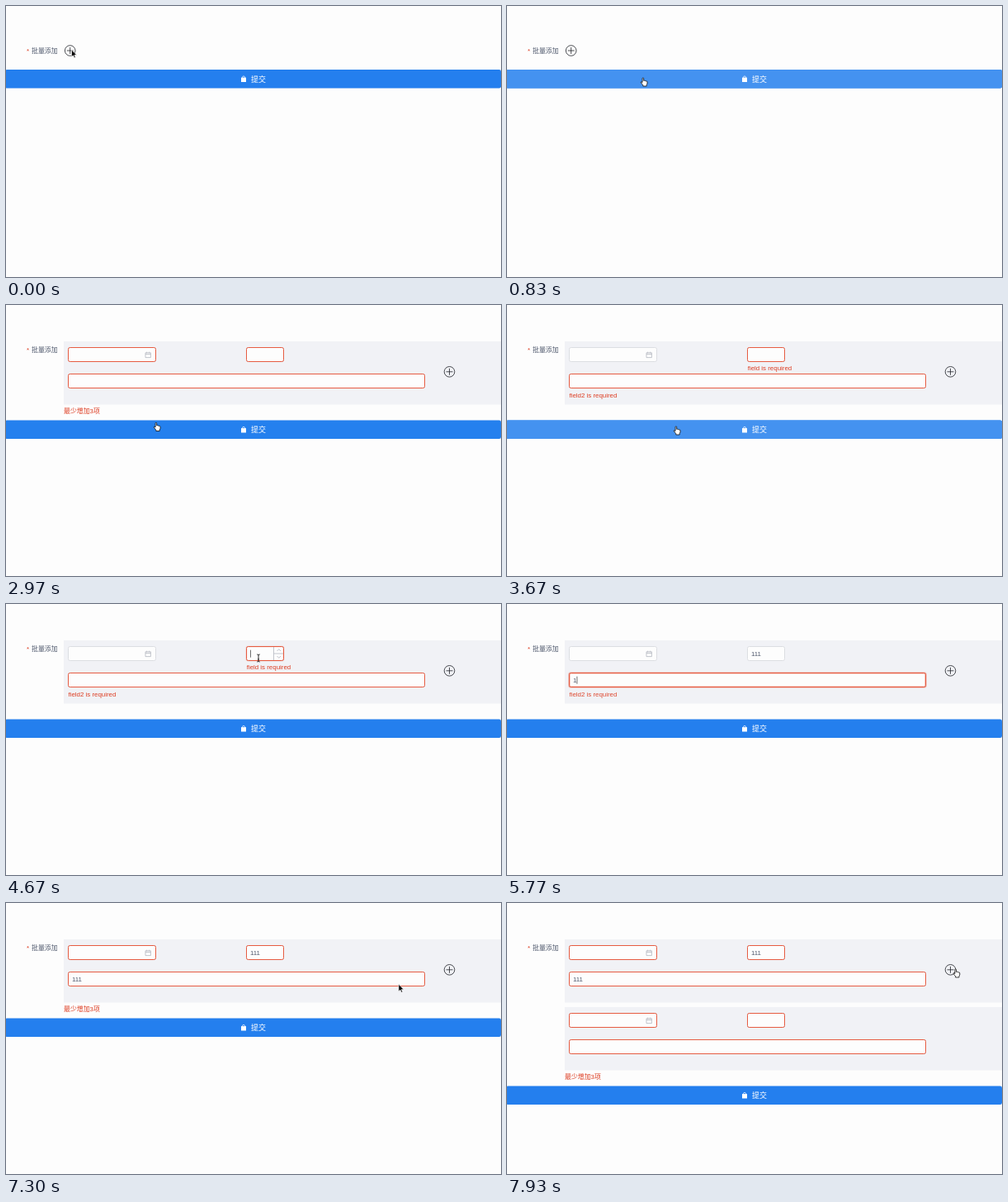
An HTML page for the animation above (8000 ms loop, 600x328 px).

```html
<!DOCTYPE html>
<html lang="zh-CN">
<head>
<meta charset="utf-8">
<title>批量添加</title>
<style>
  html, body { margin: 0; width: 100%; height: 100%; overflow: hidden; background: #fdfdfd; }
  svg { display: block; width: 100%; height: 100%; }
  text { font: 7.9px "Liberation Sans", "Noto Sans CJK SC", "Noto Sans CJK", sans-serif; white-space: pre; }
  .ink { fill: #515a6e; }
  .err { fill: #dd3d22; }
  .line { fill: none; stroke: #dcdee2; }
  .red { fill: none; stroke: #e65c42; }
  .blue { fill: none; stroke: #4a94ee; }
  .icon { fill: none; stroke: #b4b8c0; stroke-width: .8; }
</style>
</head>
<body>
<svg id="stage" viewBox="0 0 600 328" xmlns="http://www.w3.org/2000/svg">
  <text x="25" y="57.3" class="err">*</text>
  <text x="31" y="57" class="ink">批量添加</text>
  <g id="cards"></g>
  <g id="plus" fill="none" stroke="#2b2d33" stroke-width=".85">
    <circle r="6.3"/><path d="M-4 0H4M0-4V4"/>
  </g>
  <text id="minError" x="70" class="err">最少增加3项</text>
  <g id="button">
    <rect x="-1" y="77" width="601" height="22.5" rx="2.2" fill="#247fee"/>
    <rect id="hover" x="-1" y="77" width="601" height="22.5" rx="2.2" fill="#4492f0"/>
    <path d="M285 86.6h6v5.4h-6z" fill="#fff"/>
    <path d="M286.5 87v-.6a1.5 1.5 0 0 1 3 0v.6" fill="none" stroke="#fff" stroke-width=".7"/>
    <text x="297" y="91.8" fill="#fff" style="font-size:9px">提交</text>
  </g>
  <g id="cursor" stroke-linejoin="round">
    <path id="arrow" d="M0 0V8.6L2 6.8 3.3 9.8 4.7 9.2 3.4 6.3H6.1Z" stroke="#fff" stroke-width=".6"/>
    <path id="hand" d="M-.9.7a.8.8 0 0 1 1.6 0V3.4q.8-.6 1.5.2 1-.5 1.5.4 1.3-.3 1.3 1V7L4.2 8.5V10H-.2V8.7L-2.6 5.8q-.5-1.2.6-1.1L-.9 5.6Z" fill="#fff" stroke="#111" stroke-width=".8"/>
    <path id="beam" d="M-1.7-4.5Q0-4.5 0-3.4 0-4.5 1.7-4.5M0-3.4V3.4M-1.7 4.5Q0 4.5 0 3.4 0 4.5 1.7 4.5M-.9 1.4H.9" fill="none" stroke="#111" stroke-width=".9"/>
  </g>
</svg>
<script>
const LOOP = 8000;
const $ = id => document.getElementById(id);

// x, y, width of the three inputs in a card
const FIELDS = { date: [75.5, 51.5, 106], num: [291.5, 51.5, 45], text: [75.5, 83.5, 432] };

const box = ([x, y, w], cls, extra = '') =>
  `<rect x="${x}" y="${y}" width="${w}" height="17" rx="2" class="${cls}" ${extra}/>`;

function field(name, n) {
  const f = FIELDS[name], id = name + n;
  return box(f, 'line', 'style="fill:#fdfdfd"') +
    `<g id="${id}Blue">${box(f, 'blue', 'stroke-width="2.6" opacity=".25"')}${box(f, 'blue')}</g>` +
    `<g id="${id}Ring">${box(f, 'red', 'stroke-width="2.6" opacity=".35"')}</g>` +
    box(f, 'red', `id="${id}Red"`) +
    `<text id="${id}Value" class="ink" x="${f[0] + 4.5}" y="${f[1] + 11.6}"></text>`;
}

const card = n => `<g id="card${n}" transform="translate(0 ${n * 82})">
  <rect x="70" y="44" width="531" height="76.5" fill="#f1f2f6"/>
  ${Object.keys(FIELDS).map(name => field(name, n)).join('')}
  <path class="icon" d="M169 57.8h6.4v5.8H169zM169 59.6h6.4M170.7 56.7v1.6M173.7 56.7v1.6"/></g>`;

$('cards').innerHTML = card(0) + card(1) + `
  <path id="spin" class="icon" d="M324.5 52V68M324.5 60H336M328.6 57l2.2-2.4 2.2 2.4M328.6 63l2.2 2.4 2.2-2.4"/>
  <text id="numError" class="err" x="291.7" y="79.3">field is required</text>
  <text id="textError" class="err" x="75.5" y="111.5">field2 is required</text>
  <path id="caret" stroke="#333" stroke-width=".7" d="M0-4.5V4.5"/>`;

const ADD = [1950, 7600];
const TYPED = { num: [4880, 5000, 5120], text: [5750, 5880, 6010] };
const SUBMIT = 6780;

// on, off, on, off ... with the first red state starting at once
const RED = { date: [1700, 3330, SUBMIT], num: [1700, 4880, SUBMIT], text: [1700, 5800, SUBMIT] };
const HOVER = [480, 1190, 2965, 4290, 6380, 7060];

// time, x, y
const PATH = [
  [0, 79.5, 53], [200, 79.5, 53], [720, 165, 87], [1040, 165, 87], [1460, 79, 56.5],
  [2520, 79, 57], [2970, 182, 142.5], [3140, 205, 147], [4130, 205, 147], [4520, 306, 65.5],
  [5190, 306, 65.5], [5470, 300, 92], [6170, 300, 92], [6560, 296, 147],
  [6960, 296, 147], [7480, 543.8, 80]
];
const SHAPES = [
  [0, 'arrow'], [470, 'hand'], [1200, 'arrow'], [1390, 'hand'], [1960, 'beam'], [2640, 'arrow'],
  [2940, 'hand'], [4270, 'arrow'], [4460, 'beam'], [4880, ''], [5190, 'beam'], [5740, ''],
  [6170, 'beam'], [6260, 'arrow'], [6370, 'hand'], [7080, 'arrow'], [7420, 'hand']
];

const clamp = v => Math.max(0, Math.min(1, v));
const ease = v => v * v * (3 - 2 * v);
const level = (t, times, d = 200) =>
  times.reduce((v, at, i) => v + (i % 2 ? -1 : 1) * ease(clamp((t - at) / d)), 0);
const within = (t, a, b) => t >= a && t < b;
const alpha = (id, v) => $(id).setAttribute('opacity', +v.toFixed(3));
const show = (id, on) => { $(id).style.display = on ? '' : 'none'; };
const move = (id, x, y) => $(id).setAttribute('transform', `translate(${x} ${y})`);

function cursorAt(t) {
  const i = PATH.findIndex(p => p[0] > t);
  if (i < 0) return PATH[PATH.length - 1].slice(1);
  const [a, x, y] = PATH[i - 1], [b, u, v] = PATH[i];
  const k = ease((t - a) / (b - a));
  return [x + (u - x) * k, y + (v - y) * k];
}

function drawCaret(t) {
  const name = within(t, 4600, 5460) ? 'num' : within(t, 5480, SUBMIT) ? 'text' : '';
  if (!name) return show('caret', false);
  const keys = TYPED[name].filter(k => k <= t);
  const since = keys.length ? keys[keys.length - 1] : name === 'num' ? 4600 : 5480;
  const [x, y] = FIELDS[name];
  show('caret', (t - since) % 1000 < 500);
  move('caret', x + 5 + keys.length * 4.4, y + 8.7);
}

function draw(t) {
  const count = ADD.filter(at => t >= at).length;
  show('card0', count > 0);
  show('card1', count > 1);
  move('plus', ...(count ? [537.5, 80.8] : [77.7, 54]));
  move('button', 0, [0, 62.5, 144.5][count]);
  $('minError').setAttribute('y', [72.8, 130.9, 212.9][count]);
  alpha('minError', level(t, [860, 3330, SUBMIT]));
  alpha('hover', level(t, HOVER));

  for (const name in FIELDS) {
    alpha(name + '0Red', level(t, RED[name]));
    alpha(name + '1Red', 1);
    for (const id of [name + '0Ring', name + '1Ring', name + '0Blue', name + '1Blue']) alpha(id, 0);
    if (TYPED[name]) $(name + '0Value').textContent = '1'.repeat(TYPED[name].filter(k => k <= t).length);
  }
  alpha('num0Ring', level(t, [4600, 4880]));
  alpha('num0Blue', level(t, [4880, 5460]));
  alpha('text0Ring', level(t, [5480, 5800]));
  alpha('text0Blue', level(t, [5800, SUBMIT]));
  alpha('numError', level(t, [3360, 4890]));
  alpha('textError', level(t, [3360, 5740]));
  alpha('spin', level(t, [4440, 5250]));
  drawCaret(t);

  const shape = SHAPES.filter(s => s[0] <= t).pop()[1];
  for (const id of ['arrow', 'hand', 'beam']) show(id, id === shape);
  move('cursor', ...cursorAt(t));
}

const start = performance.now();
function tick() {
  draw((performance.now() - start) % LOOP);
  requestAnimationFrame(tick);
}
tick();
</script>
</body>
</html>
```
